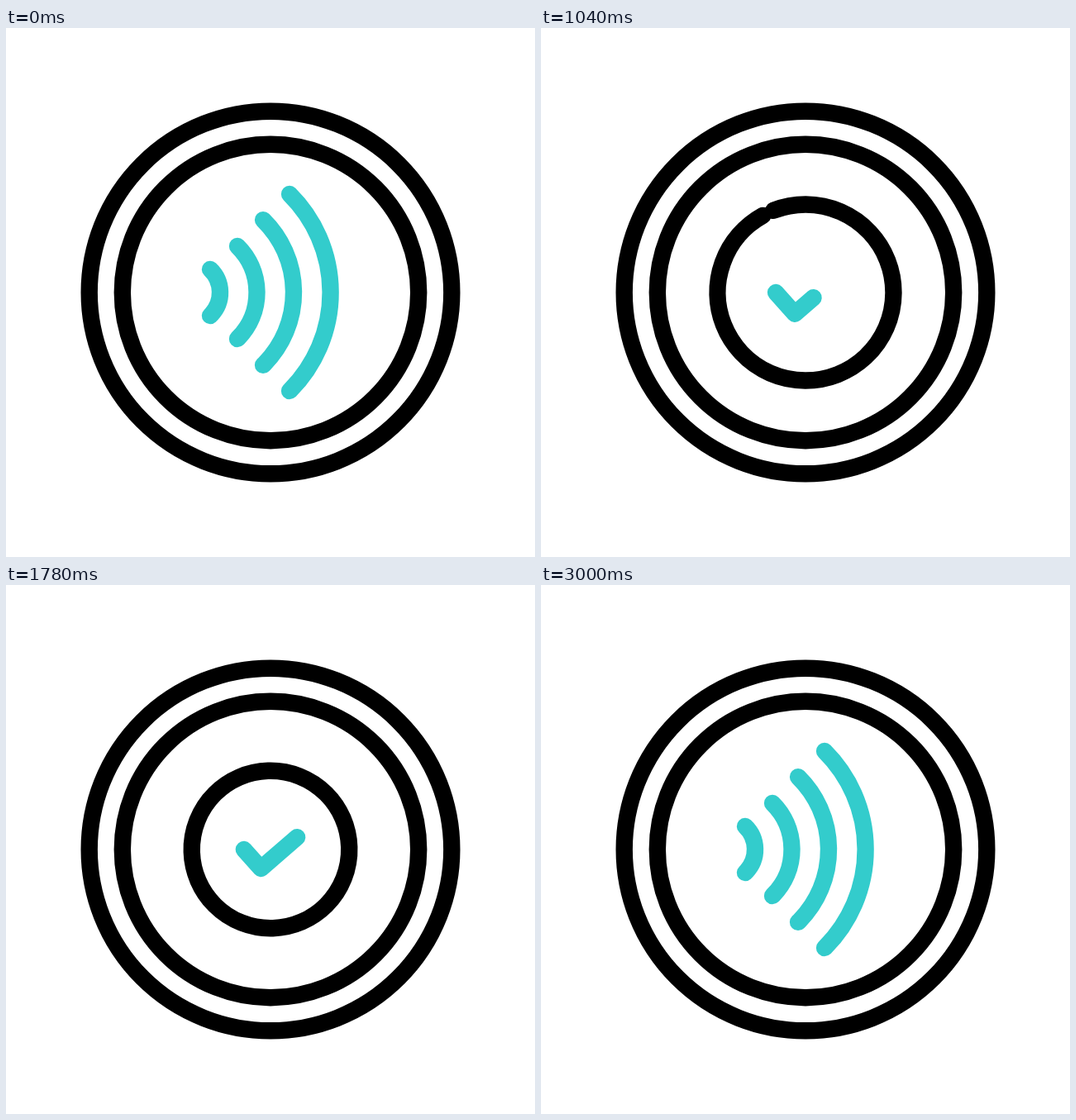
Animation of 640x640 px, one loop 3.6 s. Source, as an HTML page with a canvas:

```html
<!DOCTYPE html>
<html lang="en">
<head>
<meta charset="utf-8">
<title>Contactless payment</title>
<style>
  html, body { margin: 0; width: 100%; height: 100%; overflow: hidden; background: #fff; }
  canvas { display: block; width: 100vmin; height: 100vmin; }
</style>
</head>
<body>
<canvas id="stage" width="640" height="640"></canvas>
<script>
const ctx = document.getElementById('stage').getContext('2d');
const LOOP = 3600, STEP = 20, RAD = Math.PI / 180;
const BLACK = '#000', TEAL = '#33cccc';
const BASE = 93; // resting radius of the badge

// Waves from small to large: centre x, radius, half angle in degrees
const waves = [[220.3, 38.7, 46.4], [225, 78.5, 45.5], [225, 123, 45.6], [224.8, 167.8, 45.2]];
const tick = [[-31.4, 0], [-11.3, 22.5], [31.4, -14.5]];
// Badge pulses: start time and growth at the peak
const pulses = [[400, 24], [750, 49.5], [1100, 63], [1450, 63]];
const PULSE = 350;

// Eased progress from 0 to 1 between two times
function ease(t, from, to) {
  const u = Math.min(1, Math.max(0, (t - from) / (to - from)));
  return u * u * (3 - 2 * u);
}

function arc(x, r, from, to, color) {
  ctx.strokeStyle = color;
  ctx.beginPath();
  ctx.arc(x, 320, r, from * RAD, to * RAD);
  ctx.stroke();
}

function drawWaves(t) {
  waves.forEach(([x, r, half], i) => {
    const out = (3 - i) * 100, back = 2500 + i * 100;
    const shown = 1 - ease(t, out, out + 200) + ease(t, back, back + 200);
    if (shown > 0) arc(x, r, -half * shown, half * shown, TEAL);
  });
}

function badgeRadius(t) {
  const pulse = pulses.find(([start]) => t >= start && t < start + PULSE);
  if (!pulse) return BASE;
  const [start, grow] = pulse, mid = start + PULSE / 2;
  return BASE + grow * (ease(t, start, mid) - ease(t, mid, start + PULSE));
}

function drawBadge(t, r) {
  const leaving = t >= 2100;
  const shown = leaving ? 1 - ease(t, 2100, 2700) : ease(t, 300, 1110);
  if (shown <= 0) return;
  const start = leaving ? -266.6 + 160.6 * shown : -18.4 - 95 * shown;
  arc(320, r, start, start + 360 * shown, BLACK);
}

function drawTick(t, scale) {
  const shown = ease(t, 800, 1200) - ease(t, 2100, 2500);
  if (shown <= 0) return;
  const pts = tick.map(([x, y]) => [320 + x * scale, 320 + y * scale]);
  const span = (a, b) => Math.hypot(b[0] - a[0], b[1] - a[1]);
  let left = shown * (span(pts[0], pts[1]) + span(pts[1], pts[2]));
  ctx.strokeStyle = TEAL;
  ctx.beginPath();
  ctx.moveTo(...pts[0]);
  for (let i = 1; i < pts.length && left > 0; i++) {
    const [a, b] = [pts[i - 1], pts[i]];
    const k = Math.min(1, left / span(a, b));
    ctx.lineTo(a[0] + (b[0] - a[0]) * k, a[1] + (b[1] - a[1]) * k);
    left -= span(a, b);
  }
  ctx.stroke();
}

function draw(t) {
  ctx.fillStyle = '#fff';
  ctx.fillRect(0, 0, 640, 640);
  ctx.lineWidth = 20.4;
  ctx.lineCap = ctx.lineJoin = 'round';
  arc(320, 219.3, 0, 360, BLACK);
  arc(320, 179.2, 0, 360, BLACK);
  drawWaves(t);
  const r = badgeRadius(t);
  drawBadge(t, r);
  drawTick(t, r / BASE);
}

const begin = performance.now();
function frame() {
  const t = (performance.now() - begin) % LOOP;
  draw(Math.floor(t / STEP) * STEP);
  requestAnimationFrame(frame);
}
frame();
</script>
</body>
</html>
```
